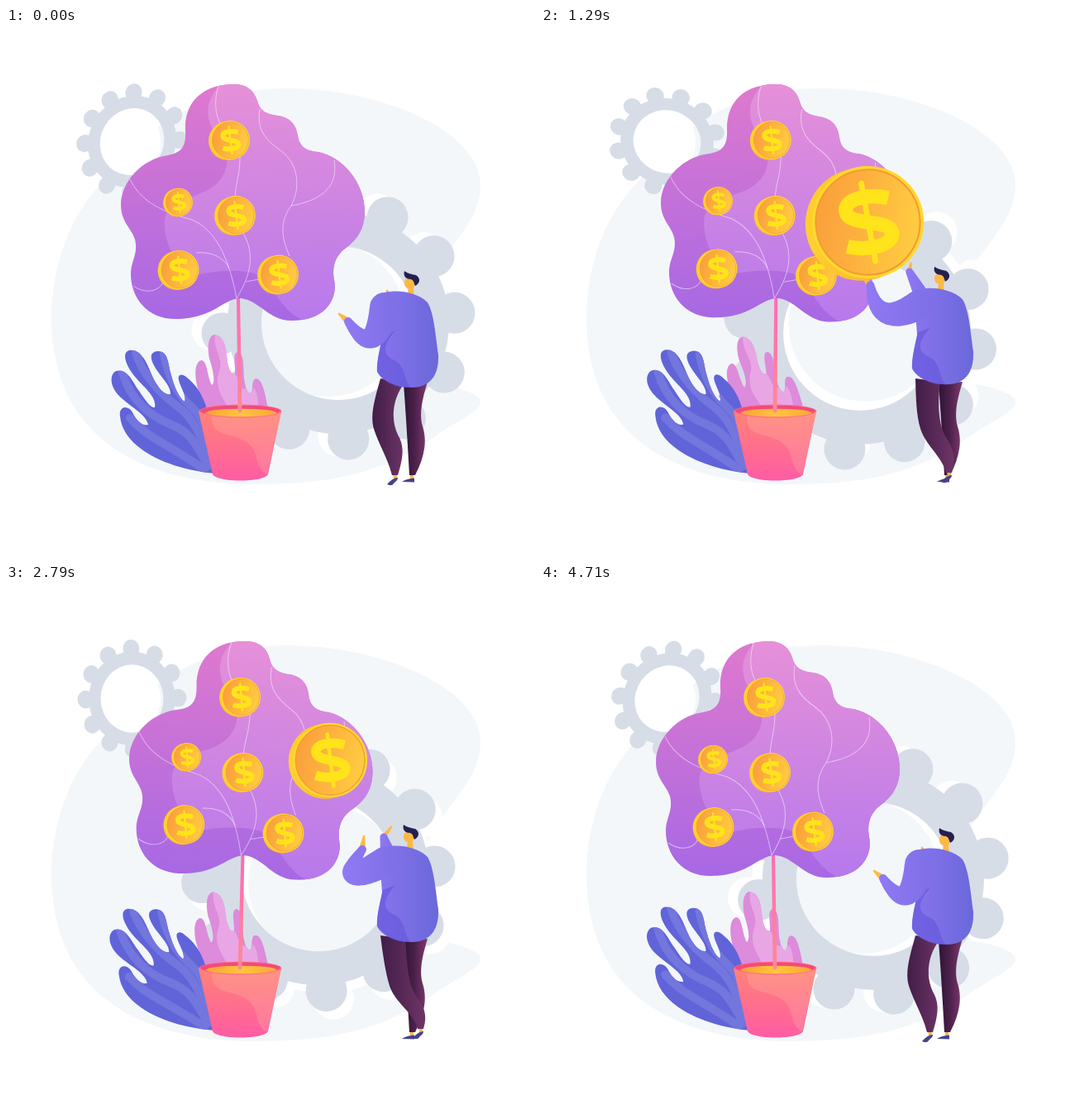
Animation, 640 px wide and 640 px high, one loop 4.78 s. Source, as an HTML page:

```html
<!DOCTYPE html>
<html lang="en">
<head>
<meta charset="utf-8">
<title>Money tree</title>
<style>
html, body { margin: 0; height: 100%; overflow: hidden; background: #fff; }
svg { display: block; width: 100vw; height: 100vh; }
.veins { fill: none; stroke: #fff; stroke-opacity: .5; }
.stripes { fill: none; stroke: #7276dd; stroke-width: 10; stroke-linecap: round; }
.skin { fill: #ffb843; }
</style>
</head>
<body>
<svg viewBox="0 0 640 640">
  <defs>
    <linearGradient id="crownLight" gradientUnits="userSpaceOnUse" x1="0" y1="68" x2="0" y2="354">
      <stop stop-color="#e690d8"/><stop offset="1" stop-color="#b679ec"/>
    </linearGradient>
    <linearGradient id="crownDark" gradientUnits="userSpaceOnUse" x1="0" y1="68" x2="0" y2="354">
      <stop stop-color="#df79ce"/><stop offset="1" stop-color="#a768e4"/>
    </linearGradient>
    <linearGradient id="trunkFill" x2="0" y2="1">
      <stop stop-color="#ff6bb6"/><stop offset="1" stop-color="#ff8a94"/>
    </linearGradient>
    <linearGradient id="potFill" x2="0" y2="1">
      <stop stop-color="#ff8376"/><stop offset="1" stop-color="#ff5ca4"/>
    </linearGradient>
    <linearGradient id="potLight" x2="0" y2="1">
      <stop stop-color="#ff9384"/><stop offset="1" stop-color="#ff77a0"/>
    </linearGradient>
    <linearGradient id="soil">
      <stop stop-color="#f9a03a"/><stop offset=".5" stop-color="#ffc63b"/><stop offset="1" stop-color="#fba63c"/>
    </linearGradient>
    <linearGradient id="gold" x2="1" y2=".25">
      <stop stop-color="#f99c3b"/><stop offset=".5" stop-color="#fdb03e"/><stop offset="1" stop-color="#ffc941"/>
    </linearGradient>
    <linearGradient id="edge" x2="1">
      <stop stop-color="#ffd02e"/><stop offset="1" stop-color="#f9a336"/>
    </linearGradient>
    <linearGradient id="sweater">
      <stop stop-color="#8a74ee"/><stop offset="1" stop-color="#6a68da"/>
    </linearGradient>
    <linearGradient id="sleeve">
      <stop stop-color="#9179f3"/><stop offset="1" stop-color="#7d6fe6"/>
    </linearGradient>
    <linearGradient id="trousers">
      <stop stop-color="#411d47"/><stop offset="1" stop-color="#6e3566"/>
    </linearGradient>
    <linearGradient id="trousersBack">
      <stop stop-color="#2f1435"/><stop offset=".45" stop-color="#4a2049"/><stop offset="1" stop-color="#7f3a70"/>
    </linearGradient>
    <path id="crownShape" d="M276 68C293 68 301 78 304 88C308 102 316 104 328 106C345 108 351 118 353 130C355 145 365 149 378 150C408 156 434 188 434 222C434 246 422 258 410 267C398 276 394 290 397 305C401 322 392 354 345 354C318 354 306 329 284 327C262 327 252 352 205 352C170 352 150 325 151 295C152 282 158 275 157 262C156 244 139 238 139 214C139 186 165 158 196 154C212 151 218 144 217 125C215 88 240 68 276 68Z"/>
    <path id="bushShape" d="M255 539C200 535 142 510 138 470C136 457 148 456 153 465C158 475 165 482 172 480C170 468 152 459 140 448C126 436 124 420 133 415C147 411 153 428 161 439C169 451 175 460 180 459C183 445 163 432 153 418C143 404 141 392 149 390C162 388 169 402 174 414C180 430 190 445 199 443C200 433 186 421 180 410C173 398 175 392 183 391C196 390 196 405 199 417C203 432 208 446 216 452C219 445 211 435 209 426C207 418 214 418 219 423C232 434 250 450 255 539Z"/>
    <clipPath id="crownClip"><use href="#crownShape"/></clipPath>
    <clipPath id="bushClip"><use href="#bushShape"/></clipPath>
    <g id="coin">
      <ellipse cx="-1.5" cy=".4" rx="23.4" ry="23.7" fill="url(#edge)"/>
      <ellipse cx="1.4" cy="-.3" rx="23.5" ry="23.6" fill="#ffd92c"/>
      <ellipse cx="1.4" cy="-.3" rx="21.9" ry="22.1" fill="url(#gold)" stroke="#f39a35" stroke-width=".7"/>
      <g transform="translate(1.6 -.3) rotate(-7)" fill="none" stroke="#ffe31b">
        <path stroke-width="6" d="M10-8.500C3-11.500-8.500-12-8.500-6C-8.500 .5 9 0 9 6C9 12-4 11.500-10.500 8.500"/>
        <path stroke-width="2.400" stroke-linecap="round" d="M0-16.500V16.500"/>
      </g>
    </g>
    <g id="smallCog"></g>
    <g id="bigCog"></g>
  </defs>

  <path fill="#f3f7fa" d="M55 350C55 285 80 225 112 192C150 152 200 73 340 73C455 73 574 125 574 190C574 235 535 262 515 302C490 340 490 400 520 430C545 434 575 442 574 453C573 465 545 475 510 500C450 540 390 552 300 552C185 552 55 510 55 350Z"/>
  <ellipse cx="148" cy="138" rx="39" ry="44" fill="#fff"/>
  <use id="smallGear" href="#smallCog" fill="#d6dde7"/>
  <g id="bigGear">
    <use href="#bigCog" x="-12" y="-4" fill="#fff"/>
    <use href="#bigCog" fill="#d6dde7"/>
  </g>

  <g id="coral">
    <path fill="#dd8bdb" d="M242 475C236 455 218 446 217 440C219 434 228 440 236 447C228 430 226 405 236 402C244 402 243 422 249 432C254 428 250 412 246 400C243 385 245 371 253 371C268 374 266 396 269 409C271 416 274 420 277 418C278 410 273 392 281 392C290 396 286 415 289 430C292 445 297 444 298 437C298 425 301 423 305 425C311 428 314 445 317 460L310 475Z"/>
    <path fill="#e9a6e5" d="M253 371C268 374 266 396 269 409C271 416 274 420 277 418C284 428 282 440 291 436C295 446 298 441 300 435C304 442 306 450 306 475H275C268 450 250 440 258 415C264 400 250 390 253 371Z"/>
  </g>
  <g id="bush">
    <use href="#bushShape" fill="#6064d8"/>
    <g class="stripes" clip-path="url(#bushClip)">
      <path d="M150 472C170 495 190 500 240 534"/>
      <path d="M141 417C150 450 175 470 200 480S230 505 245 530"/>
      <path d="M157 393C165 420 190 445 208 458S235 490 247 525"/>
      <path d="M191 395C196 420 205 440 222 456S240 480 250 510"/>
    </g>
  </g>

  <path fill="url(#potFill)" d="M233 464L250 540C255 550 312 550 317 540L333 464Z"/>
  <path fill="url(#potLight)" d="M249 468C248 497 272 488 291 501C309 514 298 530 316 541L333 464Z"/>
  <ellipse cx="283.500" cy="463.500" rx="50" ry="8" fill="#ff6f8c"/>
  <ellipse cx="283.500" cy="463" rx="48.500" ry="6.500" fill="#f44a79"/>
  <ellipse cx="284.500" cy="465.500" rx="43" ry="4.800" fill="url(#soil)"/>

  <g id="tree">
    <path fill="url(#trunkFill)" d="M279 326H283L285.500 464Q283 467 280.500 464Z"/>
    <use href="#crownShape" fill="url(#crownDark)"/>
    <path clip-path="url(#crownClip)" fill="url(#crownLight)" d="M258 60V70C235 95 244 120 262 138C272 155 270 185 240 198C215 208 194 215 192 232C190 260 205 285 225 300C240 296 275 290 302 297C325 310 330 340 358 353H450V60Z"/>
    <g class="veins">
      <path d="M257 70C250 95 255 110 264 125M283 155C283 180 278 185 277 205"/>
      <path d="M307 98C302 125 318 138 332 148C352 162 358 190 345 215C330 235 334 255 343 276"/>
      <path d="M397 160C402 190 385 208 345 215M150 183C165 215 200 225 225 232C255 245 270 280 279 327"/>
      <path d="M285 245C298 265 302 290 279 327M230 272C252 270 265 280 270 291M154 312C170 323 186 318 190 307M290 307L306 304"/>
    </g>
    <use href="#coin" transform="translate(270 136)"/>
    <use href="#coin" transform="translate(208 211) scale(.72)"/>
    <use href="#coin" transform="translate(277 227)"/>
    <use href="#coin" transform="translate(208.500 293)"/>
    <use href="#coin" transform="translate(329 298.500)"/>
  </g>

  <path class="skin" d="M489 538H493V545H489Z"/>
  <path fill="#45438a" d="M479 549C484 546 489 545 494 544.500V549.500Z"/>
  <path fill="url(#trousersBack)" d="M481 430C484 470 486 505 488 541H495C506 520 510 500 504 482C499 465 505 445 510 428Z"/>
  <g id="foot">
    <path class="skin" d="M-2-2H2.500L3 4H-1Z"/>
    <path fill="#45438a" d="M-9 11C-5 7-1 3 4 3C4 7 0 8-2 11.500Q-6 13-9 11Z"/>
  </g>
  <path id="frontLeg" fill="url(#trousers)"/>
  <path id="backHand" class="skin"/>
  <path id="backArm" fill="url(#sleeve)"/>
  <g id="head">
    <path class="skin" d="M483 304C490 301 495 304 495 309L493 315L494 325H485L487 315C482 314 481 309 483 304Z"/>
    <path fill="#23204f" d="M482 294C486 297 491 298 496 299C502 303 501 309 495 312C493 308 494 306 490 304C485 304 480 301 482 294Z"/>
  </g>
  <g id="torso">
    <path fill="url(#sweater)" d="M458 320C475 316 498 320 510 332C518 345 520 375 523 395C524 415 517 430 500 434C485 437 460 433 449 416C448 405 452 390 455 375C454 355 450 335 458 320Z"/>
    <path fill="#6558dd" fill-opacity=".65" d="M471 366C455 385 455 395 470 402C485 410 480 425 490 435C470 436 452 425 449 415C449 400 453 385 456 372Z"/>
  </g>
  <path id="frontHand" class="skin"/>
  <path id="frontArm" fill="url(#sleeve)"/>
  <use id="bigCoin" href="#coin"/>
</svg>
<script>
const LOOP = 4780, STEPS = 67;
const $ = id => document.getElementById(id);
const move = (id, transform) => $(id).setAttribute('transform', transform);
const setPath = (id, d) => $(id).setAttribute('d', d);
const circle = (x, y, r) => `M${x - r} ${y}a${r} ${r} 0 1 0 ${2 * r} 0a${r} ${r} 0 1 0 ${-2 * r} 0`;
const lerp = (a, b, k) => a.map((v, i) => v + (b[i] - v) * k);

const rest = { cuff: [414, 355], elbow: [441, 375], tip: [403, 346], backCuff: [465, 326], backTip: [461, 318], head: [0, 0], torso: [0, 0] };
const hold = { cuff: [393, 296], elbow: [409, 334], tip: [386, 288], backCuff: [439, 284], backTip: [443, 273], head: [-8, -7], torso: [0, -5] };
const release = { cuff: [431, 320], elbow: [420, 349], tip: [433, 304], backCuff: [457, 305], backTip: [466, 293], head: [-1, -4], torso: [0, -3] };

function blend(from, to, k) {
  const pose = {};
  for (const joint in from) pose[joint] = lerp(from[joint], to[joint], k);
  return pose;
}

function cog(id, outer, hole, toothAt, toothRadius, phase) {
  let shape = `<path fill-rule="evenodd" d="${circle(0, 0, outer)}${circle(0, 0, hole)}"/>`;
  for (let a = phase; a < 360 + phase; a += 30)
    shape += `<circle cx="${toothAt}" r="${toothRadius}" transform="rotate(${a})"/>`;
  $(id).innerHTML = shape;
}

// Tapered limb: a row of circles along a curve through three [x, y, radius] joints.
function limb(id, start, end, mid = lerp(start, end, .5)) {
  const bend = start.map((a, i) => 2 * mid[i] - (a + end[i]) / 2);
  let d = '';
  for (let t = 0; t <= 1; t += 1 / 64)
    d += circle(...lerp(lerp(start, bend, t), lerp(bend, end, t), t));
  setPath(id, d);
}

function drawArms(pose) {
  const lift = pose.torso[1];
  move('head', `translate(${pose.head})`);
  move('torso', `translate(${pose.torso})`);
  limb('backArm', [463, 332 + lift, 10], [...pose.backCuff, 4.5]);
  limb('backHand', [...pose.backCuff, 3], [...pose.backTip, 1.3]);
  limb('frontArm', [458, 338 + lift, 18], [...pose.cuff, 5], [...pose.elbow, 12.5]);
  limb('frontHand', [...pose.cuff, 4], [...pose.tip, 1.3]);
}

function drawLeg(stride) {
  const [kx, ky] = lerp([459, 488], [478, 488], stride);
  const [ax, ay] = lerp([470, 541], [501, 537], stride);
  move('foot', `translate(${ax} ${ay})`);
  setPath('frontLeg', `M453 424C${kx / 2 + 217} ${ky - 40} ${kx - 19} ${ky - 20} ${kx - 14} ${ky - 3}
    C${kx - 7} ${ky + 18} ${ax - 8} ${ay - 20} ${ax - 3} ${ay}H${ax + 4}
    C${ax + 11} ${ay - 22} ${kx + 23} ${ky + 17} ${kx + 15} ${ky + 4}
    C${kx + 7} ${ky - 13} ${kx + 7} ${ky - 38} 483 428Z`);
}

function draw() {
  const step = Math.floor(performance.now() % LOOP / LOOP * STEPS);
  const ramp = (from, to) => {
    const k = Math.min(1, Math.max(0, (step - from) / (to - from)));
    return k * k * (3 - 2 * k);
  };
  const angle = step / STEPS * 2 * Math.PI;
  const sway = 1 - Math.cos(angle), flutter = 1 - Math.cos(2 * angle);
  const turn = step / STEPS * 360 + 3 * flutter;

  move('smallGear', `translate(152.5 137.5) rotate(${30 - turn}) scale(.95 1.03)`);
  move('bigGear', `translate(389 357) rotate(${turn}) translate(13 0)`);
  move('tree', `rotate(${1.22 * sway} 283 464)`);
  move('bush', `rotate(${-1.3 * Math.sin(2 * angle)} 250 538)`);
  move('coral', `rotate(${-2.8 * flutter} 275 463)`);

  const lift = ramp(8, 23);
  const letGo = blend(blend(rest, hold, lift), release, ramp(29, 39));
  drawArms(blend(letGo, rest, ramp(39, 56)));
  drawLeg(lift - ramp(43, 62));

  const grow = ramp(1, 6), shrink = ramp(29, 49), vanish = ramp(54, 60);
  const x = 407 - 12.5 * grow - 4 * lift - 2 * shrink;
  const y = 346 - 65.5 * grow - 60 * lift - 16 * shrink;
  const size = 2.88 * grow * (1 - .67 * shrink) * (1 - vanish);
  move('bigCoin', `translate(${x} ${y}) rotate(${-13 * (1 - lift)}) scale(${size})`);
  requestAnimationFrame(draw);
}

cog('smallCog', 55, 40, 59, 10.5, 0);
cog('bigCog', 134, 93, 141, 25, -5);
draw();
</script>
</body>
</html>
```
